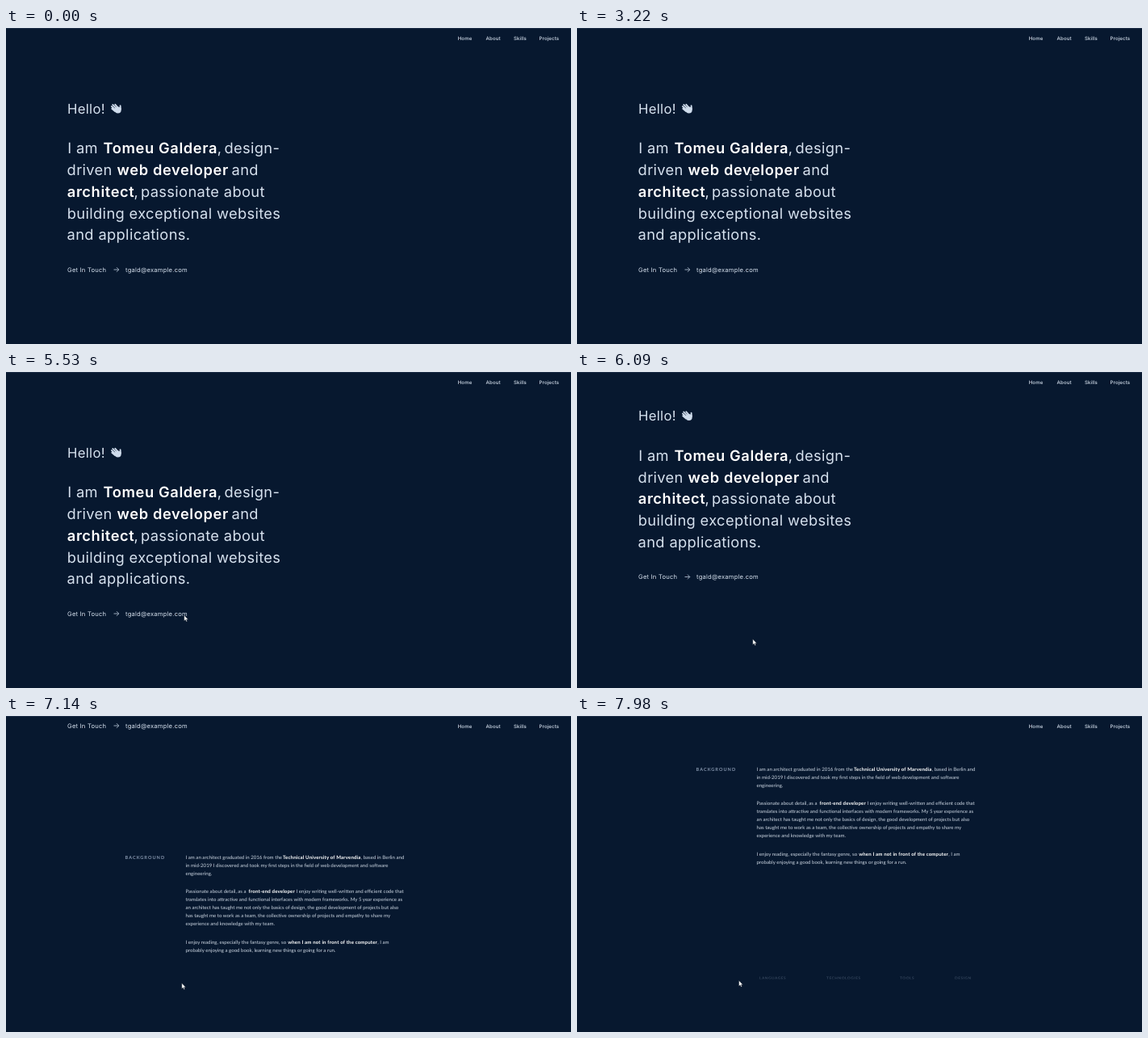
An HTML page that plays this animation: 700x391 px, repeating every 8 s.

```html
<!DOCTYPE html>
<html lang="en">
<head>
<meta charset="utf-8">
<title>Portfolio scroll</title>
<style>
  html, body { margin: 0; width: 100%; height: 100%; overflow: hidden; background: #07182f; }
  svg { display: block; width: 100%; height: 100%; }
  text { white-space: pre; text-rendering: geometricPrecision; fill: #d6e1ee; }
  .hello, .lead, .lead-b, .contact, .nav { font-family: Inter, Roboto, sans-serif; }
  .hello { font-size: 16.7px; letter-spacing: .3px; }
  .lead { font-size: 18.3px; letter-spacing: .35px; }
  .lead-b { font-size: 18.3px; letter-spacing: .6px; font-weight: 600; fill: #fff; }
  .contact { font-size: 7.6px; letter-spacing: .22px; }
  .nav { font-size: 6.1px; letter-spacing: .12px; font-weight: 500; }
  .copy, .copy-b, .label, .skill { font-family: Lato, "Open Sans", sans-serif; }
  .copy { font-size: 6.1px; fill: #ccd6e2; }
  .copy-b { font-size: 6.1px; font-weight: 700; letter-spacing: .15px; fill: #fff; }
  .label { font-size: 5.6px; font-weight: 700; letter-spacing: 1px; fill: #8494ab; }
  .skill { font-size: 4.8px; font-weight: 700; letter-spacing: .5px; fill: #7c8da5; }
</style>
</head>
<body>
<svg viewBox="0 0 700 391" preserveAspectRatio="none">
  <defs>
    <clipPath id="reveal"><rect x="200" y="700" width="320" height="21.5"/></clipPath>
  </defs>
  <rect width="700" height="391" fill="#07182f"/>
  <g id="page">
    <g fill="none" stroke="#cfdcec" stroke-linecap="round" stroke-width="1.8">
      <path d="M135 103L131.2 99.8M135.8 101.4L130.9 97M137.2 99.8L132.2 94.9M138.8 98.6L135.2 94.6M142 100.4L141.6 96.2"/>
      <circle cx="138.7" cy="101.6" r="4" fill="#cfdcec" stroke="none"/>
    </g>
    <path d="M133.5 299H139.6M137 296.2L139.8 299L137 301.8" fill="none" stroke="#a9b7c9" stroke-width=".9"/>
    <g id="skills" clip-path="url(#reveal)"></g>
  </g>
  <g id="nav"></g>
  <rect width="700" height="1" fill="#1b2c45"/>
  <g id="cursor">
    <path id="arrow" d="M0 0V7L1.6 5.6L2.7 8L3.8 7.5L2.8 5.2H4.9Z" fill="#fff" stroke="#0a1220" stroke-width=".4"/>
    <path id="beam" d="M-1.4 0Q0 0 0 .8Q0 0 1.4 0M0 .8V6.4M-1.4 7.2Q0 7.2 0 6.4Q0 7.2 1.4 7.2" fill="none" stroke="#aab4c2" stroke-width=".8"/>
  </g>
</svg>
<script>
const LOOP = 8000, STEP = 70;
const $ = id => document.getElementById(id);
const page = $("page"), skills = $("skills");

function write(parent, cls, y, ...runs) {
  for (const [x, words, kind] of runs) {
    const el = document.createElementNS("http://www.w3.org/2000/svg", "text");
    el.setAttribute("class", kind ? cls + "-" + kind : cls);
    el.setAttribute("x", x);
    el.setAttribute("y", y);
    el.textContent = words;
    parent.append(el);
  }
}

write($("nav"), "nav", 15, [559.7, "Home"], [594.6, "About"], [629, "Skills"], [660.5, "Projects"]);

write(page, "hello", 105.6, [76, "Hello!"]);
const leadY = i => 155.4 + i * 26.7;
write(page, "lead", leadY(0), [76.2, "I am"], [120.6, "Tomeu Galdera", "b"], [261.8, ","], [270.4, "design-"]);
write(page, "lead", leadY(1), [75.6, "driven"], [137.6, "web developer", "b"], [279.6, "and"]);
write(page, "lead", leadY(2), [75.8, "architect", "b"], [158.4, ","], [167, "passionate about"]);
write(page, "lead", leadY(3), [75.8, "building exceptional websites"]);
write(page, "lead", leadY(4), [75.6, "and applications."]);
write(page, "contact", 301.7, [76, "Get In Touch"], [148, "tgald@example.com"]);

const left = 222.5;
write(page, "label", 463.7, [147.6, "BACKGROUND"]);
write(page, "copy", 463.5,
  [left, "I am an architect graduated in 2016 from the"],
  [343, "Technical University of Marvendia", "b"],
  [439.7, ", based in Berlin and"]);
write(page, "copy", 473.5, [left, "in mid-2019 I discovered and took my first steps in the field of web development and software"]);
write(page, "copy", 483.5, [left, "engineering."]);
write(page, "copy", 506,
  [left, "Passionate about detail, as a"],
  [300.6, "front-end developer", "b"],
  [359.6, "I enjoy writing well-written and efficient code that"]);
write(page, "copy", 516, [left, "translates into attractive and functional interfaces with modern frameworks. My 5 year experience as"]);
write(page, "copy", 526, [left, "an architect has taught me not only the basics of design, the good development of projects but also"]);
write(page, "copy", 536, [left, "has taught me to work as a team, the collective ownership of projects and empathy to share my"]);
write(page, "copy", 546, [left, "experience and knowledge with my team."]);
write(page, "copy", 568.5,
  [left, "I enjoy reading, especially the fantasy genre, so"],
  [349.2, "when I am not in front of the computer", "b"],
  [460.2, ", I am"]);
write(page, "copy", 578.5, [left, "probably enjoying a good book, learning new things or going for a run."]);
write(skills, "skill", 722.3, [226, "LANGUAGES"], [309, "TECHNOLOGIES"], [400, "TOOLS"], [468, "DESIGN"]);

// Rows of [time, values...]; linear between rows
const scrollKeys = [[5740, 0], [5880, 12], [6090, 45.5], [6300, 72], [6440, 92], [6580, 116], [6790, 167],
  [7000, 254], [7140, 287], [7280, 293], [7350, 300], [7560, 350], [7770, 386], [7980, 396]];
const cursorKeys = [[1400, 203, 111], [2300, 203, 111], [3200, 215, 180], [4000, 227, 236], [4480, 228, 239],
  [4830, 228, 241], [5600, 220, 307], [5810, 217.8, 330.5], [7350, 217.8, 330.5], [7840, 200.6, 327.3]];
const fadeKeys = [[7840, 0], [7980, .4]];

function at(keys, t) {
  const next = keys.findIndex(k => k[0] > t);
  if (next === 0) return keys[0].slice(1);
  if (next < 0) return keys[keys.length - 1].slice(1);
  const a = keys[next - 1], b = keys[next];
  const p = (t - a[0]) / (b[0] - a[0]);
  return a.slice(1).map((v, i) => v + (b[i + 1] - v) * p);
}

function draw(now) {
  const t = Math.floor((now % LOOP) / STEP) * STEP;
  const [scroll] = at(scrollKeys, t);
  const [x, y] = at(cursorKeys, t);
  const onText = y > 136 && y < 266;
  page.setAttribute("transform", `translate(0 ${-scroll})`);
  skills.setAttribute("opacity", at(fadeKeys, t)[0]);
  $("cursor").setAttribute("transform", `translate(${x} ${y})`);
  $("cursor").setAttribute("visibility", t < cursorKeys[0][0] ? "hidden" : "visible");
  $("arrow").setAttribute("opacity", onText ? 0 : 1);
  $("beam").setAttribute("opacity", onText ? 1 : 0);
}

const start = performance.now();
function tick() {
  draw(performance.now() - start);
  requestAnimationFrame(tick);
}
tick();
</script>
</body>
</html>
```
